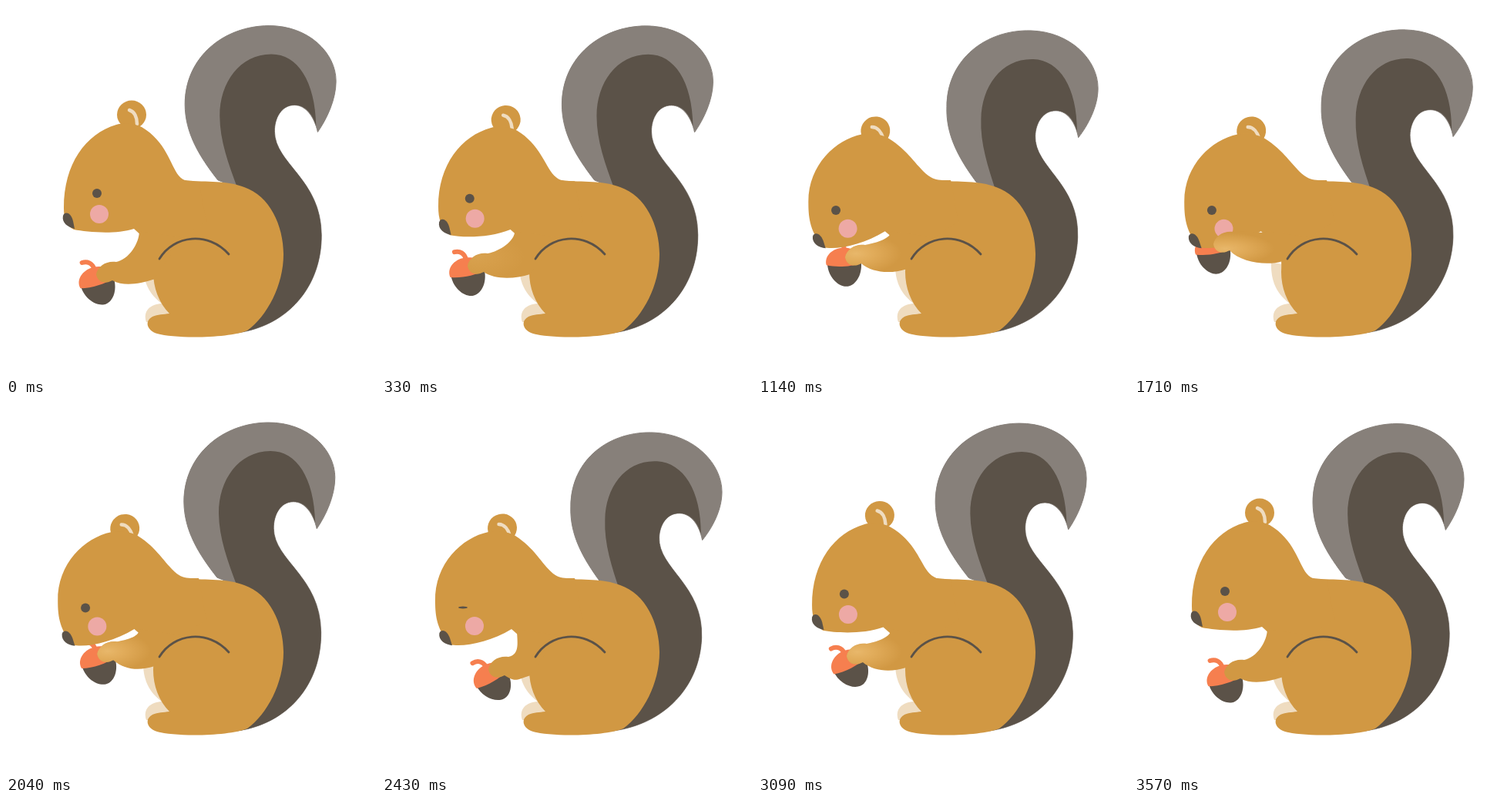
An HTML page that plays this animation: 480 by 480 pixels, repeating every 3600 ms.

```html
<!DOCTYPE html>
<html lang="en">
<head>
<meta charset="utf-8">
<title>Nibbling squirrel</title>
<style>
  html, body { margin: 0; width: 100%; height: 100%; overflow: hidden; background: #fff; }
  svg { display: block; width: 100vw; height: 100vh; }
  .fur { fill: #d19843; }
  .dark { fill: #5b5248; }
  .cream { fill: #efdcc0; }
  .cap { fill: #f67f4f; }
  .line { fill: none; stroke-linecap: round; }
</style>
</head>
<body>
<svg viewBox="0 0 480 480">
  <defs>
    <radialGradient id="glow" cx=".12" cy=".55" r=".5">
      <stop offset="0" stop-color="#f2c57c" stop-opacity=".7"/>
      <stop offset=".4" stop-color="#f0be70" stop-opacity=".5"/>
      <stop offset="1" stop-color="#f0be70" stop-opacity="0"/>
    </radialGradient>
  </defs>

  <path id="tail" fill="#87807a" stroke="#87807a" stroke-linejoin="round"/>
  <path id="stripe" class="dark"/>

  <path class="cream" d="M178 332C177 358 186 374 202 386L215 340Z"/>
  <path class="cream" d="M182 410C177 396 187 386 204 386L214 400L190 410Z"/>

  <g id="acorn">
    <path class="line" d="M0 -19C-1 -28 -7 -32 -14 -31" stroke="#f67f4f" stroke-width="6"/>
    <path class="dark" d="M-22 -4C-22 15 -8 28 3 28C14 28 24 14 22 -4Z"/>
    <path class="cap" d="M-23 1C-27 -13 -12 -23 0 -22C12 -23 24 -14 22 -3C10 2 -8 4 -23 1Z"/>
  </g>

  <path class="fur" d="M232 226C262 229 286 226 309 235C342 246 360 285 360 322C360 362 339 402 313 421C290 431 220 432 196 425C183 421 179 409 190 403C197 400 204 400 212 399C198 385 191 365 191 345C192 325 190 310 180 292L190 250Z"/>

  <g id="ear">
    <ellipse class="fur" rx="19" ry="18.5"/>
    <path class="line" d="M-3 -6C4 -4 7 4 7 12" stroke="#efdcc0" stroke-width="4.5"/>
  </g>
  <path id="head" class="fur"/>
  <path id="nose" class="dark" d="M-7 -9C-2 -13 3 -8 5 0L7 10C-2 8 -10 2 -8 -7Z"/>
  <circle id="cheek" r="12" fill="#eda9a5"/>
  <ellipse id="eye" class="dark" rx="6"/>

  <path id="arm" class="fur"/>
  <path id="shine" fill="url(#glow)"/>
  <path class="line" d="M199 328C218 297 262 292 289 322" stroke="#5b5248" stroke-width="2.8"/>
</svg>
<script>
const LOOP = 3600, STEP = 30;

// Key moments: time, then the values reached there
const sway = [[690, 0, 0], [1300, 1.2, 7], [1560, 1.2, 7], [2020, -.3, -2], [2430, 1, 11], [2760, -.4, -1]]; // swing, droop
const nods = [[160, 0, 0], [600, 1, 0], [1250, 1.05, 1.2], [1600, 1.05, 1.2], [2430, 1, 0], [3090, .17, 1.3], [3570, 0, 0]]; // nod, lean
const reach = [[150, 129, 346, -12], [560, 114, 319, 2], [720, 114, 319, 2], [1140, 125, 324, 1],
  [1710, 115, 307, -4], [2430, 150, 342, -25], [3090, 127, 325, -22], [3520, 129, 346, -12]]; // hand x, y, tilt
const blinks = [690, 2430];

const tail = "M301 236L276 226C252 195 234 165 234 128C234 66 285 26 343 26C395 26 430 62 430 98C430 122 418 147 406 164C402 145 391 129 376 129C359 129 350 146 350 163C350 205 410 225 410 297C410 365 365 415 300 424Z";
const stripe = "M302 238C290 205 279 175 279 143C279 100 305 63 346 63C380 63 403 98 404 156C400 142 391 129 376 129C359 129 350 146 350 163C350 205 410 225 410 297C410 365 365 415 300 424Z";
const headUp = "M250 228C238 228 231 228 224 220C213 206 208 176 176 157C166 152 152 151 143 154C103 166 75 205 75 262C75 275 78 285 88 290C105 293 140 297 166 289L200 320L260 280Z";
const headDown = "M250 226C238 226 231 227 222 220C206 206 198 187 173 171C163 165 148 164 138 166C104 173 68 207 69 256C69 277 72 293 88 312C105 316 140 309 168 292L200 320L260 280Z";

const el = id => document.getElementById(id);
const set = (id, name, value) => el(id).setAttribute(name, value);
const place = (id, x, y, turn = 0) => set(id, "transform", `translate(${x} ${y}) rotate(${turn})`);
const clamp = v => Math.min(1, Math.max(0, v));
const mix = (a, b, u) => a + (b - a) * u;
const warp = (d, fn) => d.replace(/(-?[\d.]+) (-?[\d.]+)/g, (_, x, y) => fn(+x, +y).join(" "));

// Cosine ease from key to key, around the loop
function at(keys, t) {
  const n = keys.length, i = keys.findLastIndex(k => k[0] <= t);
  const a = keys[(i + n) % n], b = keys[(i + 1) % n];
  const span = (b[0] - a[0] + LOOP) % LOOP, past = (t - a[0] + LOOP) % LOOP;
  const u = (1 - Math.cos(Math.PI * past / span)) / 2;
  return a.slice(1).map((v, j) => mix(v, b[j + 1], u));
}

function drawTail(t) {
  const [swing, droop] = at(sway, t);
  const bend = (x, y) => {
    const k = clamp((424 - y) / 300);
    return [x + 11 * swing * k, y + droop * k * (1 + (x - 340) / 200)];
  };
  set("tail", "d", warp(tail, bend));
  set("stripe", "d", warp(stripe, bend));
}

function drawHead(t) {
  const [nod, lean] = at(nods, t);
  const down = headDown.match(/\d+/g).map(Number);
  let i = 0;
  set("head", "d", warp(headUp, (x, y) => {
    const px = mix(x, down[i++], nod), py = mix(y, down[i++], nod);
    return [px - 3 * lean * clamp((240 - px) / 60), py];
  }));
  const feature = (id, x, y, dx, dy, turn = 0) =>
    place(id, x + dx * nod - 3 * lean, y + dy * nod, turn * nod);
  feature("ear", 163, 141, -7, 20, -15);
  feature("nose", 82, 279, 1, 25, -6);
  feature("cheek", 121, 270, -1, 18);
  feature("eye", 118, 243, -13, 21);
  const gap = Math.min(...blinks.map(b => Math.abs(t - b)));
  set("eye", "ry", mix(1.4, 6, clamp((gap - 60) / 60)));
}

function drawArm(t) {
  const [x, y, tilt] = at(reach, t);
  const chest = 160 + x * .1, end = 342 + (y - 325) * .6;
  const d = `M${chest} 292C${chest} ${mix(292, y, .3)} ${x + 30} ${y - 17} ${x + 14} ${y - 14}`
    + `C${x + 2} ${y - 16} ${x - 10} ${y - 9} ${x - 12} ${y + 2}`
    + `C${x - 10} ${y + 13} ${x} ${y + 15} ${x + 9} ${y + 10}`
    + `C${x + 24} ${(y + end) / 2 + 14} 173 ${end + 6} 192 ${end}L230 300Z`;
  set("arm", "d", d);
  set("shine", "d", d);
  set("shine", "opacity", clamp((338 - y) / 10));
  set("acorn", "transform", `translate(${x} ${y}) rotate(${tilt}) translate(-13 12)`);
}

let start;
function tick(now) {
  start ??= now;
  const t = Math.floor((now - start) % LOOP / STEP) * STEP;
  drawTail(t);
  drawHead(t);
  drawArm(t);
  requestAnimationFrame(tick);
}
tick(performance.now());
</script>
</body>
</html>
```
